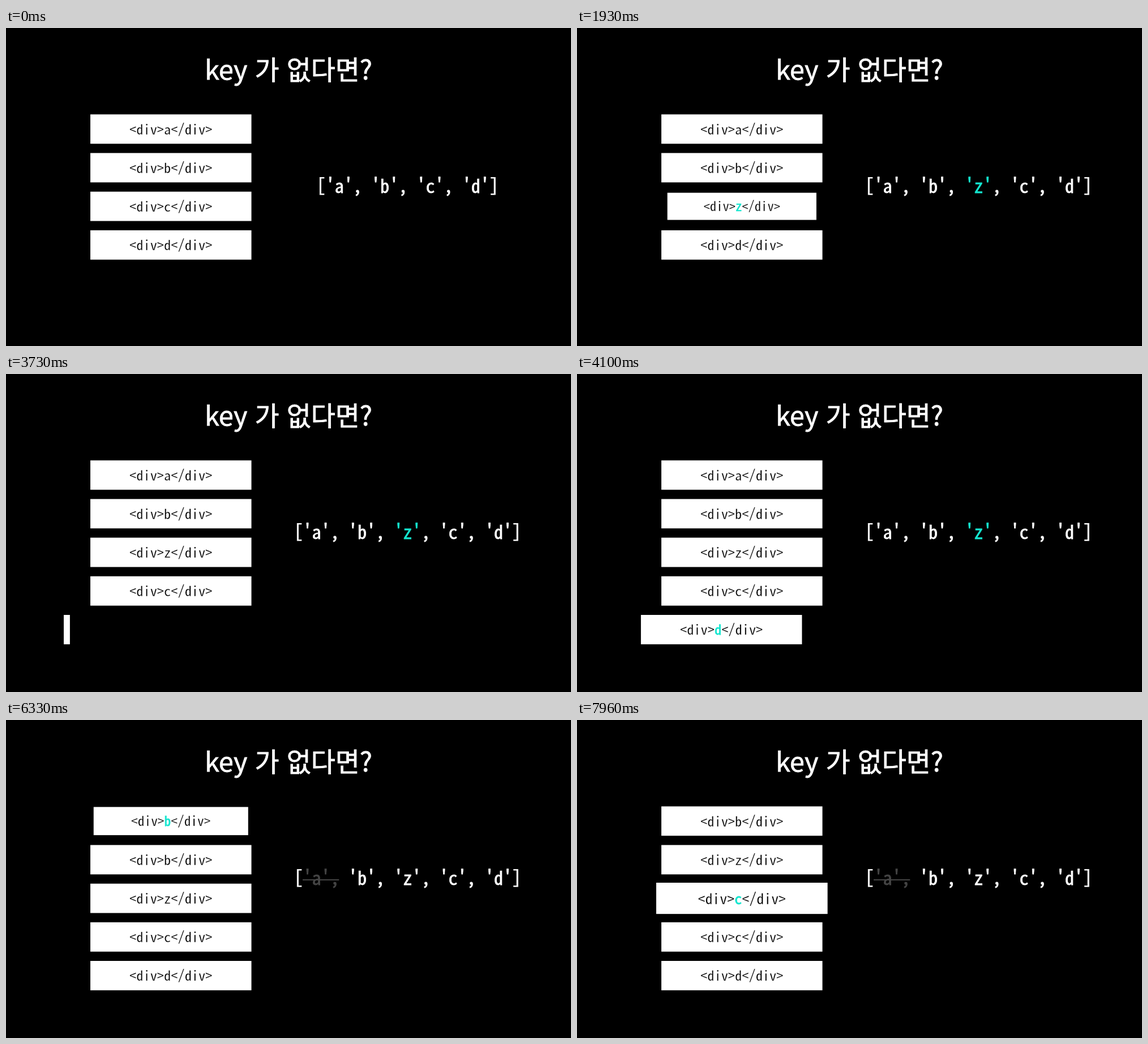
These frames come from a looping animation (998x561 px, 8 s). An HTML page:

```html
<!DOCTYPE html>
<html lang="ko">
<head>
<meta charset="utf-8">
<title>key 가 없다면?</title>
<style>
  html, body { margin: 0; width: 100%; height: 100%; overflow: hidden; background: #000; }
  svg { display: block; width: 100%; height: 100%; }
  text { text-anchor: middle; white-space: pre; }
  text, tspan, .off { fill: currentColor; }
  .title { font: 46.8px "Noto Sans CJK KR", "Noto Sans CJK", sans-serif; color: #fff; stroke: currentColor; stroke-width: 0.8px; }
  .code, .list {
    font-family: "Noto Sans Mono CJK KR", "Noto Sans Mono", monospace;
    font-variant-ligatures: none;
  }
  .code { font-size: 24.4px; font-weight: 300; color: #000; stroke: #fff; stroke-width: 0.3px; }
  .list { font-size: 32.15px; color: #fff; stroke: currentColor; stroke-width: 0.8px; }
  .hot { color: #14e6cf; stroke: currentColor; stroke-width: 0.8px; }
  .off { color: #444; }
  tspan.off { stroke: currentColor; }
</style>
</head>
<body>
<svg viewBox="0 0 998 561">
  <clipPath id="gate"><rect x="102" y="420" width="400" height="62"/></clipPath>
  <text class="title" x="499" y="90.5">key 가 없다면?</text>
  <g id="rows"></g>
  <text class="list" id="list" x="709.3" y="291"></text>
  <rect class="off" id="strike" x="524" y="281" width="64.3" height="2"/>
</svg>
<script>
const LOOP = 8000;
const BOX = { x: 291.25, y: 178.3, w: 284.5, h: 51.8, pitch: 68.15 };
const SLIDE = { start: 3698, shown: 3725, end: 4360, distance: 331.5 };
const PULSE = 520;

// Each state is [start time, letter, highlighted]; a highlight starts a pulse.
const ROWS = [
  [[0, 'a'], [6030, 'b', true], [6930, 'b']],
  [[0, 'b'], [7000, 'z', true], [7830, 'z']],
  [[0, 'c'], [1500, 'z', true], [2400, 'z'], [7900, 'c', true]],
  [[0, 'd'], [2470, 'c', true], [3300, 'c']],
  [[0, 'd', true], [4960, 'd']],
];
const LISTS = [
  [0, ['a', 'b', 'c', 'd']],
  [660, ['a', 'b', 'z', 'c', 'd'], 'z', 'hot'],
  [4960, ['a', 'b', 'z', 'c', 'd'], 'a', 'off'],
];

const byId = id => document.getElementById(id);
const span = (cls, text) => `<tspan class="${cls}">${text}</tspan>`;
const stateAt = (states, t) => states.findLast(([start]) => t >= start);

function setMarkup(el, markup) {
  if (el.markup !== markup) el.innerHTML = el.markup = markup;
}

function listMarkup([, letters, marked, cls]) {
  const items = letters.map((letter, i) => {
    const quoted = `'${letter}'`;
    const comma = i < letters.length - 1 ? ',' : '';
    if (letter !== marked) return quoted + comma;
    return cls === 'off' ? span(cls, quoted + comma) : span(cls, quoted) + comma;
  });
  return `[${items.join(' ')}]`;
}

function pulseScale(age) {
  if (age <= 0 || age >= PULSE) return 1;
  const wave = Math.sin(2 * Math.PI * age / PULSE);
  return 1 + wave * (wave > 0 ? 0.095 : 0.085);
}

// Solves the cubic timing curve (.25, .1, .25, 1) for time x.
function ease(x) {
  const curve = (u, a, b) => 3 * u * (1 - u) ** 2 * a + 3 * u * u * (1 - u) * b + u ** 3;
  let lo = 0, hi = 1;
  for (let i = 0; i < 20; i++) {
    const mid = (lo + hi) / 2;
    if (curve(mid, 0.25, 0.25) < x) lo = mid; else hi = mid;
  }
  return curve(lo, 0.1, 1);
}

byId('rows').innerHTML = ROWS.map((_, i) => `
  <g ${i === 4 ? 'clip-path="url(#gate)"' : ''}><g class="row">
    <rect x="${-BOX.w / 2}" y="${-BOX.h / 2}" width="${BOX.w}" height="${BOX.h}" fill="#fff"/>
    <text class="code" y="9.4"></text>
  </g></g>`).join('');
const rows = [...document.querySelectorAll('.row')];

function draw(t) {
  rows.forEach((row, i) => {
    const [start, letter, hot] = stateAt(ROWS[i], t);
    const slides = i === 4;
    const progress = Math.min(1, Math.max(0, (t - SLIDE.start) / (SLIDE.end - SLIDE.start)));
    const x = BOX.x - (slides ? SLIDE.distance * (1 - ease(progress)) : 0);
    const scale = hot && !slides ? pulseScale(t - start) : 1;
    row.setAttribute('transform', `translate(${x} ${BOX.y + i * BOX.pitch}) scale(${scale})`);
    row.setAttribute('visibility', slides && t < SLIDE.shown ? 'hidden' : 'visible');
    setMarkup(row.querySelector('text'),
      `&lt;div&gt;${hot ? span('hot', letter) : letter}&lt;/div&gt;`);
  });
  const list = stateAt(LISTS, t);
  setMarkup(byId('list'), listMarkup(list));
  byId('strike').setAttribute('visibility', list[3] === 'off' ? 'visible' : 'hidden');
}

let origin = null;
function tick() {
  const now = performance.now();
  origin ??= now;
  draw((now - origin) % LOOP);
  requestAnimationFrame(tick);
}
tick();
</script>
</body>
</html>
```
